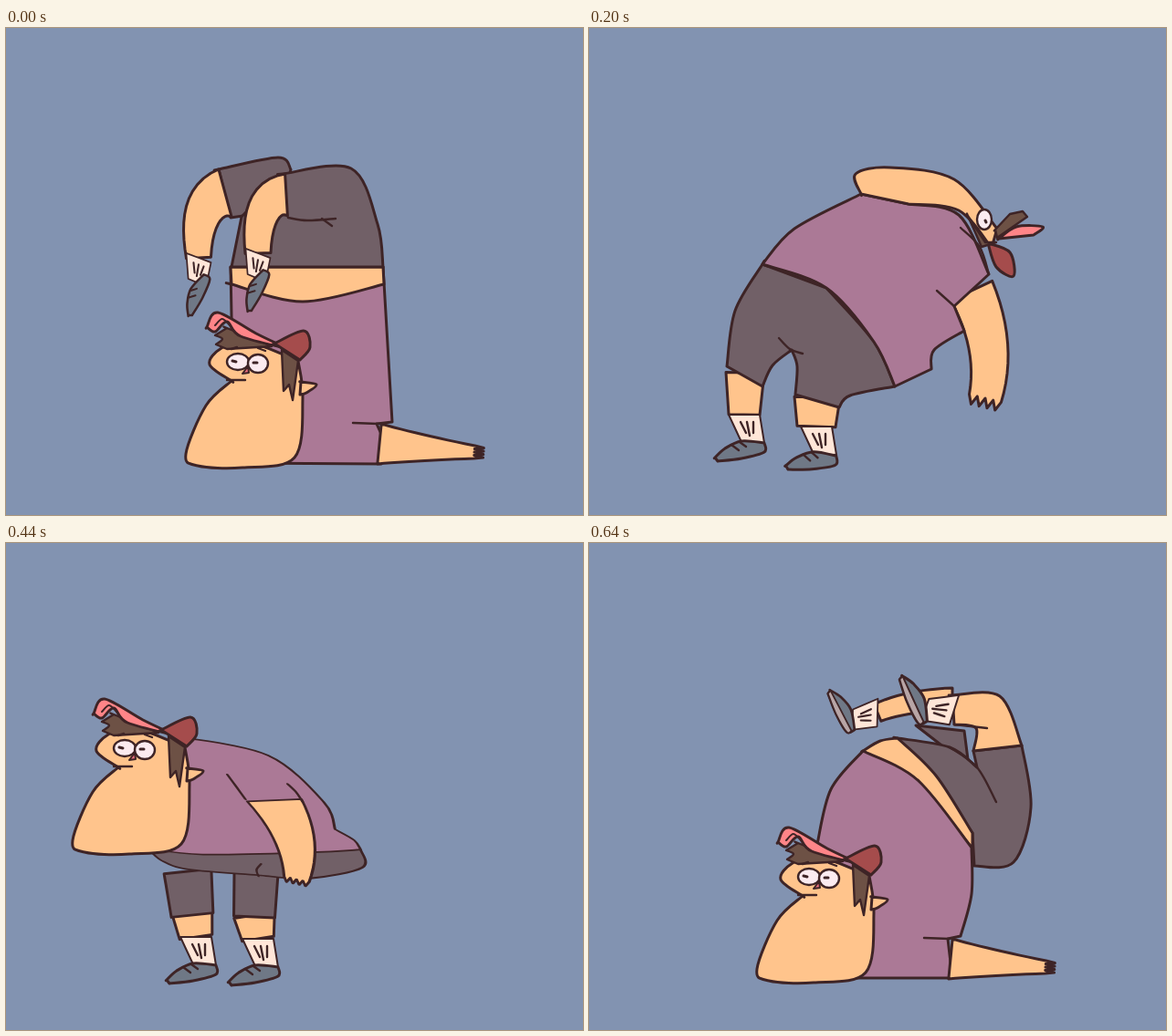
An HTML page with a canvas for the animation above (680 ms loop, 632 by 534 pixels).

```html
<!DOCTYPE html>
<html lang="en">
<head>
<meta charset="utf-8">
<title>Somersault</title>
<style>
html, body { margin: 0; overflow: hidden; background: #8293b1; }
canvas { display: block; }
</style>
</head>
<body>
<canvas width="632" height="534"></canvas>
<script>
const ctx = document.querySelector('canvas').getContext('2d');
const SKIN = '#ffc48c', SHORTS = '#716067';

// Adds a smooth curve through the points to the current path.
function spline(points) {
  const at = i => points[Math.max(0, Math.min(points.length - 1, i))];
  for (let i = 0; i < points.length - 1; i++) {
    const [a, b, c, d] = [at(i - 1), at(i), at(i + 1), at(i + 2)];
    ctx.bezierCurveTo(b[0] + (c[0] - a[0]) / 6, b[1] + (c[1] - a[1]) / 6,
      c[0] - (d[0] - b[0]) / 6, c[1] - (d[1] - b[1]) / 6, ...c);
  }
}

function parse(text) {
  const n = text.trim().split(/\s+/).map(Number);
  return n.flatMap((x, i) => i % 2 ? [] : [[x, n[i + 1]]]);
}

function finish(color, width = 3) {
  ctx.closePath();
  ctx.fillStyle = color;
  ctx.fill();
  ctx.lineWidth = width;
  ctx.stroke();
}

// Closed outline that starts at a corner; "|" marks the other corners.
function shape(color, text, width) {
  const runs = text.split('|').map(s => s.trim() ? parse(s) : []);
  const start = runs[0][0];
  runs[runs.length - 1].push(start);
  ctx.beginPath();
  ctx.moveTo(...start);
  let last = start;
  for (const run of runs) {
    spline([last, ...run]);
    last = run[run.length - 1];
  }
  finish(color, width);
}

function line(text, width = 2.4) {
  for (const part of text.split(',')) {
    const points = parse(part);
    ctx.beginPath();
    ctx.moveTo(...points[0]);
    spline(points);
    ctx.lineWidth = width;
    ctx.stroke();
  }
}

function oval(color, x, y, rx, ry) {
  ctx.beginPath();
  ctx.ellipse(x, y, rx, ry, 0, 0, 7);
  finish(color, 2.4);
}

// Tapered limb along a bend, with a row of fingers if it ends in a hand.
function limb(color, w0, w1, text, hand) {
  const p = parse(text), a = p[0], c = p[p.length - 1];
  const b = p[2] ? p[1] : [(a[0] + c[0]) / 2, (a[1] + c[1]) / 2];
  const point = (t, side, out = 0) => {
    const [x, y] = [0, 1].map(k => (1 - t) ** 2 * a[k] + 2 * t * (1 - t) * b[k] + t * t * c[k]);
    const [u, v] = [0, 1].map(k => (1 - t) * (b[k] - a[k]) + t * (c[k] - b[k]));
    const len = Math.hypot(u, v), w = side * (w0 + (w1 - w0) * t) / 2;
    return [x + (u * out - v * w) / len, y + (v * out + u * w) / len];
  };
  const n = 12;
  ctx.beginPath();
  for (let i = 0; i <= n; i++) ctx.lineTo(...point(i / n, 1));
  if (hand) for (let i = 1; i < 8; i++) ctx.lineTo(...point(1, 1 - i / 4, i % 2 * 10));
  for (let i = n; i >= 0; i--) ctx.lineTo(...point(i / n, -1));
  finish(color);
}

const paint = (color, width) => text => shape(color, text, width);
const skin = paint(SKIN), shirt = paint('#ab7996'), shorts = paint(SHORTS);
const hair = paint('#6d5145', 2.4), cap = paint('#a54c4c'), brim = paint('#ff8588');

function place(matrix, draw) {
  ctx.save();
  ctx.transform(...matrix);
  draw();
  ctx.restore();
}
const shift = (x, y, draw) => place([1, 0, 0, 1, x, y], draw);

// Sock hanging from its top edge and a shoe hinged at the ankle.
function foot(x, y, turn = 0, flex = 0, size = 1, soled = false) {
  ctx.save();
  ctx.translate(x, y);
  ctx.rotate(turn);
  ctx.scale(size, size);
  shape('#ffe6d8', '-17 0 | -3 30 | 22 31 | 17 0 |', 2);
  for (const i of [0, 1, 2]) line(`${i * 7 - 4} 8 ${i * 4 + 2} ${20 + i % 2 * 3}`);
  ctx.translate(9, 30);
  ctx.rotate(flex);
  shape('#6f7886', '-41 17 -30 7 -12 -1 13 1 | 13 11 -12 18 -38 21 |');
  if (soled) shape('#b8a5a6', '-41 17 | 13 5 | 13 11 -12 18 -38 21 |', 2);
  else line('-23 3 -15 9, -14 0 -7 5');
  ctx.restore();
}

function features() {
  skin('254 137 271 140 260 149 253 151 |');
  line('173 135 193 135');
  hair('173 78 222 98 | 173 101 | 161 96 | 168 90 160 86 |');
  brim('151 77 163 61 205 84 241 101 | 188 87 173 71 160 82');
  line('160 75 168 68 177 76', 2);
  cap('225 95 257 81 264 99 253 113 |');
  hair('233 102 | 235 147 | 241 140 | 245 157 | 251 114 |');
  oval('#fbebf0', 185, 115, 12, 9);
  oval('#fbebf0', 207, 117, 11, 10);
  shape('#ee7081', '190 128 | 196 120 | 197 127 |', 2);
  line('179 114 183 115, 202 116 206 116', 3);
  line('178 101 184 99, 207 100 215 103');
}

function head() {
  skin('178 136 154 118 167 100 196 93 251 114 | 256 155 247 220 190 231 141 229 128 216 150 163');
  features();
}

function legs() {
  limb(SKIN, 44, 36, '204 405 208 432');
  limb(SHORTS, 52, 46, '199 360 204 408');
  foot(208, 432);
  limb(SKIN, 45, 35, '272 408 276 434');
  limb(SHORTS, 48, 45, '274 362 272 410');
  foot(276, 434);
}

function torso() {
  shorts('144 325 | 151 347 175 363 249 374 | 300 380 366 360 376 327 |');
  line('258 353 249 364 247 376');
  shirt('162 232 145 280 144 325 | 200 336 320 332 376 327 | 375 310 361 290 | 366 240 335 155 250 121 |');
  limb(SKIN, 61, 26, '313 237 318 310 287 381', true);
  line('278 190 280 212 282 235, 338 207 342 222 343 240', 3);
}

function stand() {
  legs();
  torso();
  head();
}

// Standing pose leaning from the feet.
const lean = (k, tall) => () => place([1, 0, -k, tall, 480 * k, 480 - 480 * tall], stand);

function flatArm() {
  limb(SKIN, 44, 14, '409 456 450 460 513 465', true);
  line('380 433 408 434');
}

function headstand() {
  shorts('233 155 298 142 312 155 | 300 200 | 246 208 |');
  limb(SKIN, 54, 27, '240 181 207 190 211 252');
  foot(211, 252, .36, -1.28, .85);
  shirt('246 262 | 250 477 | 411 478 | 414 455 406 434 | 423 432 | 413 262 |');
  skin('247 281 325 300 414 281 | 413 262 | 246 262 |');
  shorts('303 160 378 154 407 215 413 262 | 247 262 | 258 207 |');
  limb(SKIN, 46, 28, '307 183 274 185 276 247');
  line('309 208 330 211 361 209, 346 209 357 217');
  foot(276, 247, .36, -1.28, .85);
  flatArm();
  shift(69, 251, head);
}

function fold() {
  shorts('113 321 150 297 218 289 | 138 367 |');
  limb(SKIN, 52, 35, '127 344 98 372 119 426');
  foot(119, 426, 0, 0, 1.08);
  skin('370 426 425 403 457 462 | 482 466 | 434 477 | 440 458 432 436 | 396 469 |');
  shirt('324 280 375 310 390 365 390 416 | 370 426 390 443 396 469 | 330 480 225 471 226 400 | 213 369 |');
  line('347 435 362 429 390 416');
  shorts('181 327 215 292 270 275 324 280 | 315 335 280 364 213 369 | 216 352 |');
  line('215 354 225 345 242 337', 3);
  limb(SKIN, 44, 36, '198 340 175 368 191 426');
  foot(191, 426, .1, 0, 1.08);
}

function bendBack() {
  limb(SKIN, 42, 34, '171 378 170 424');
  foot(170, 424);
  limb(SKIN, 50, 42, '250 405 249 437');
  foot(249, 437, 0, .1);
  shorts('190 259 160 310 151 371 | 190 393 | 201 370 222 353 | 228 371 226 402 | 274 416 | 286 403 335 393 | 312 344 260 285 |');
  line('208 340 220 352 234 357');
  limb(SKIN, 50, 36, '419 288 448 350 434 406', true);
  shirt('298 182 225 220 190 259 | 260 285 312 344 335 393 | 375 374 | 378 353 411 332 | 400 305 | 438 270 | 405 205 350 193 |');
  line('381 288 400 305, 407 219 428 240 438 270');
  skin('298 182 292 160 330 153 400 166 447 220 | 441 241 | 405 200 350 193 |');
  brim('449 231 468 218 497 218 487 227 |');
  hair('445 221 461 204 | 475 201 | 480 207 | 447 230 |');
  cap('437 236 461 246 465 272 446 262');
  hair('415 206 430 240 | 446 235 | 434 235 |');
  oval('#fbebf0', 433, 210, 8, 11);
  line('434 211 435 213', 3);
}

function dive() {
  legs();
  place([1, 0, .35, .6, -102, 140], torso);
  shift(-55, 110, head);
}

function kneel() {
  foot(424, 428, -1.17, -1.03, .85);
  skin('328 419 345 435 390 446 | 374 424 |');
  shorts('364 380 328 418 | 375 421 |');
  skin('440 404 457 432 | 451 461 418 457 380 428 |');
  foot(454, 447, -1.17, -1.03, .9);
  shorts('358 235 418 286 440 404 | 380 428 | 367 390 371 300 |');
  skin('339 231 | 358 235 | 369 269 371 308 |');
  shirt('190 277 235 244 340 231 | 371 300 364 380 | 313 422 | 249 430 | 228 439 | 195 400 |');
  limb(SKIN, 54, 16, '273 419 315 463 381 465', true);
  line('298 407 288 393 283 377');
  skin('172 331 160 315 177 293 218 291 | 233 305 221 375 229 428 219 454 140 450 118 410 140 348');
  place([.82, 0, 0, 1, 28, 195], features);
}

function kick() {
  limb(SKIN, 44, 34, '440 255 500 255 528 276');
  foot(528, 276, -.94, -2.58, .9);
  limb(SKIN, 66, 36, '460 300 500 306 530 318');
  foot(530, 318, -.94, -2.58, .95);
  shorts('330 226 400 218 478 264 | 455 335 398 350 | 378 280 |');
  shirt('223 332 250 262 330 226 | 378 280 398 350 383 432 | 367 434 | 372 477 | 240 477 |');
  shift(-39, 0, flatArm);
  shift(30, 251, head);
}

function rollUp() {
  shorts('358 200 | 411 206 | 416 245 |');
  limb(SKIN, 20, 26, '316 186 350 172 398 172');
  foot(316, 186, 1.6, -.29, .9, true);
  shorts('338 214 395 224 425 246 | 421 228 | 474 222 | 484 290 465 350 422 354 | 420 318 |');
  line('395 224 425 246 446 284');
  skin('398 167 450 168 474 222 | 421 228 | 424 203 400 199 |');
  line('400 199 436 203');
  foot(400, 183, 1.88, -.52, 1, true);
  skin('300 228 319 217 338 214 | 380 255 420 318 | 420 335 | 360 260 |');
  shirt('250 330 265 270 300 228 | 360 260 419 334 | 419 385 407 431 | 393 434 | 398 477 | 270 477 |');
  shift(-13, 0, flatArm);
  shift(56, 251, head);
}

const tuck = () => place([1, .16, 0, 1.25, 0, -181], fold);

// Pose and the time in ms at which it ends.
const poses = [
  [headstand, 80], [tuck, 120], [fold, 200], [bendBack, 240],
  [lean(-.09, 1.015), 280], [stand, 320], [lean(.034, .995), 360],
  [lean(.052, .992), 440], [dive, 520], [kneel, 600], [kick, 640], [rollUp, 680],
];

ctx.lineJoin = ctx.lineCap = 'round';
ctx.strokeStyle = '#3e2426';

function frame() {
  const t = performance.now() % 680;
  ctx.fillStyle = '#8293b1';
  ctx.fillRect(0, 0, 632, 534);
  poses.find(([, end]) => t < end)[0]();
  requestAnimationFrame(frame);
}
frame();
</script>
</body>
</html>
```
